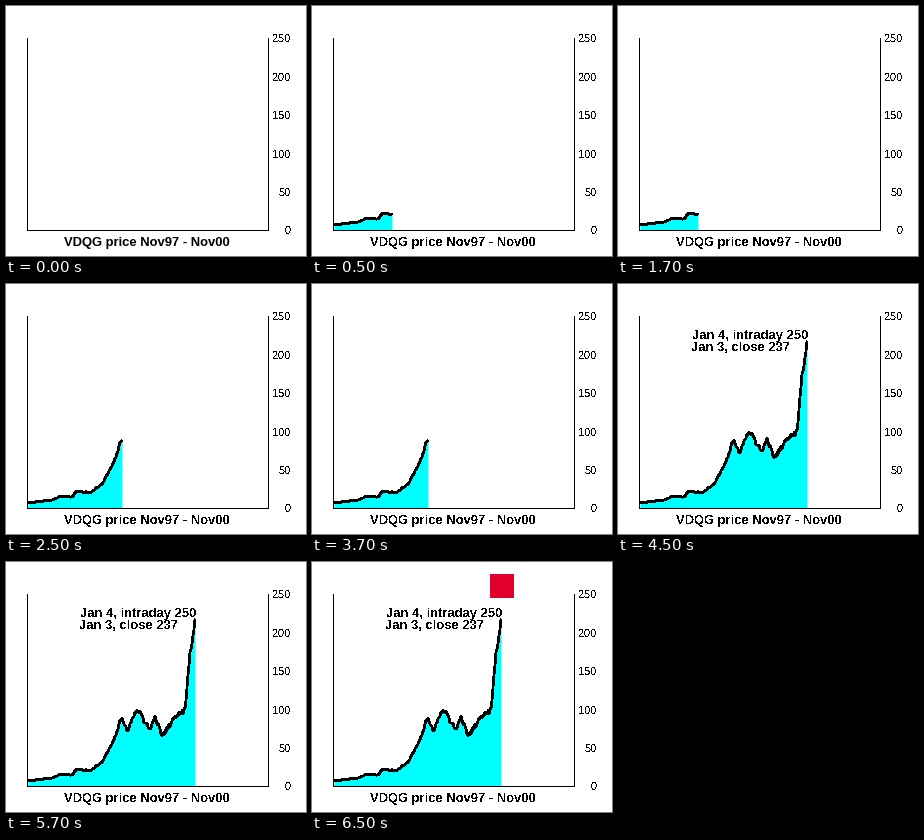
Write a matplotlib script that moves like this. It is 300 px wide and 250 px high and loops after 8 s.

```python
import matplotlib.pyplot as plt
import numpy as np
from matplotlib.animation import FuncAnimation
from matplotlib.patches import Rectangle

WIDTH, HEIGHT, DPI = 300, 250, 100
STEP_MS, LOOP_MS = 500, 8000
PT = 72 / DPI  # points per pixel
LEFT, RIGHT, TOP, BASE = 21, 262, 32, 224
PX_PER_DOLLAR = (BASE - TOP) / 250
TITLE = "VDQG price Nov97 - Nov00"

fig = plt.figure(figsize=(WIDTH / DPI, HEIGHT / DPI), dpi=DPI, facecolor="white")
ax = fig.add_axes([0, 0, 1, 1])
ax.axis("off")
ax.set(xlim=(0, WIDTH), ylim=(HEIGHT, 0))


def block(x, y, w, h, color="black"):
    return ax.add_patch(Rectangle((x, y), w, h, fc=color, lw=0,
                                  antialiased=False, zorder=4))


def label(x, y, text, size=13, weight="bold", ha="left", smooth=False):
    return ax.text(x, y, text, fontsize=size * PT, weight=weight, ha=ha,
                   va="baseline", family="Liberation Sans",
                   antialiased=smooth, zorder=5)


def price_curve():
    """Main swings of the price, roughened in proportion to its height."""
    swings = [(22, 5), (46, 8), (54, 11.5), (66, 11), (71, 17), (84, 15),
              (96, 24), (108, 46), (115, 69), (121, 55), (131, 77), (144, 56),
              (149, 69), (156, 50), (170, 69), (179, 76), (184, 130), (189, 167)]
    x = np.arange(22, 190)
    height = np.interp(x, *zip(*swings))
    roughness = np.random.default_rng(4).uniform(-0.04, 0.04, x.size)
    roughness[-1] = 0
    return x, BASE - height * (1 + roughness)


def price_area(end):
    """Filled price curve from the left axis up to x = end."""
    x, y = price_curve()
    shown = x <= end
    x, y = x[shown], y[shown]
    fill = ax.fill_between(x, y, BASE, color="#00ffff", lw=0,
                           antialiased=False, zorder=2)
    line, = ax.plot(x, y, color="black", lw=1.7 * PT, antialiased=False,
                    solid_capstyle="butt", solid_joinstyle="round", zorder=3)
    return [fill, line]


for x in (LEFT, RIGHT):
    block(x, TOP, 1, BASE - TOP + 1)
block(LEFT, BASE, RIGHT - LEFT + 1, 1)
for price in range(0, 251, 50):
    label(285, BASE + 4.4 - price * PX_PER_DOLLAR, str(price), 11, "normal", "right")

thin_title = label(58, 240, TITLE, smooth=True)
bold_title = label(58, 240, TITLE)
notes = [label(74, 55, "Jan 4, intraday 250"),
         label(73, 67, "Jan 3, close 237")]
badge = block(178, 12, 24, 24, "#e0002b")

# Each entry: artists and the time span in which they show
spans = [
    ([thin_title], 0, 500),
    ([bold_title], 500, LOOP_MS),
    (price_area(80), 500, 2500),
    (price_area(116), 2500, 4500),
    (price_area(189) + notes, 4500, LOOP_MS),
    ([badge], 6500, LOOP_MS),
]


def update(frame):
    now = frame * STEP_MS
    for artists, start, end in spans:
        for artist in artists:
            artist.set_visible(start <= now < end)
    return []


anim = FuncAnimation(fig, update, frames=LOOP_MS // STEP_MS,
                     interval=STEP_MS, repeat=True, repeat_delay=0)
plt.show()
```
